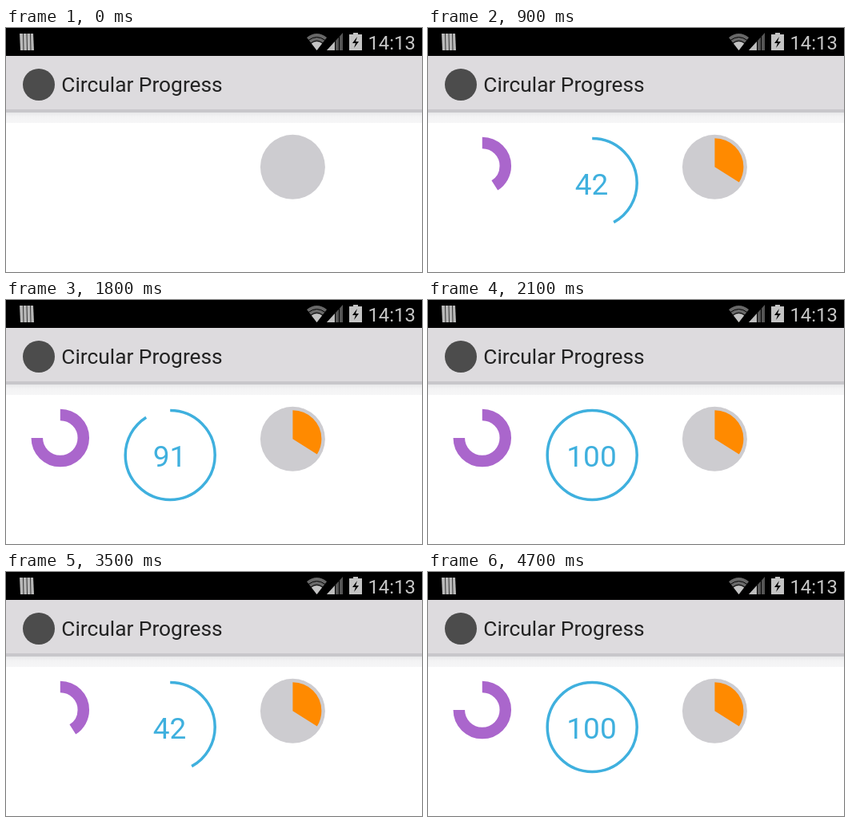
Write an HTML page that moves like this. It is 520x306 px and loops after 5300 ms.

```html
<!DOCTYPE html>
<html lang="en">
<head>
<meta charset="utf-8">
<title>Circular Progress</title>
<style>
  html, body { margin: 0; width: 100%; height: 100%; overflow: hidden; background: #fff; }
  svg { display: block; width: 520px; height: 306px; }
  text { font-family: Roboto, sans-serif; }
  .dial { fill: none; }
</style>
</head>
<body>
<svg viewBox="0 0 520 306">
  <defs>
    <linearGradient id="shade" x2="0" y2="1">
      <stop offset="0" stop-color="#e8e8ea"/>
      <stop offset="0.4" stop-color="#f3f3f4"/>
      <stop offset="1" stop-color="#f6f6f7"/>
    </linearGradient>
  </defs>

  <!-- status bar -->
  <rect width="520" height="35"/>
  <path d="M17 7h17l1 21H18Z" fill="#b9b9b9"/>
  <path d="M21.500 7l.5 21M26 7l.5 21M30.500 7l.5 21" stroke="#333"/>
  <path d="M388.500 28L376 12Q388.500 2 401 12Z" fill="#686868"/>
  <path d="M388.500 28L382 19.500Q388.500 15 395 19.500Z" fill="#c4c4c4"/>
  <path d="M378 15.500Q388.500 7.500 399 15.500M381 19Q388.500 13 396 19" fill="none" stroke="#000"/>
  <path d="M401 28H421V6Z" fill="#555"/>
  <path d="M401 28H411V17Z" fill="#bdbdbd"/>
  <path d="M411.500 6v22M416.500 6v22" stroke="#000"/>
  <path d="M429 8h5V6h6v2h5v20h-16Z" fill="#c4c4c4"/>
  <path d="M439 11l-6 8h4l-2 6 6-8h-4Z"/>
  <text x="452.500" y="26.500" font-size="23.800" fill="#c6c6c6">14:13</text>

  <!-- action bar -->
  <rect y="35" width="520" height="67" fill="#dddbde"/>
  <rect y="102" width="520" height="4" fill="#c8c7cb"/>
  <rect y="106" width="520" height="13" fill="url(#shade)"/>
  <circle cx="41" cy="71" r="20" fill="#4c4c4c"/>
  <text x="69.300" y="80" font-size="26.300" fill="#222">Circular Progress</text>

  <!-- progress views -->
  <circle cx="358.400" cy="174.300" r="40.500" fill="#cdccd0"/>
  <g id="dials"></g>
  <text id="count" x="204.500" y="208.500" font-size="37" text-anchor="middle" fill="#3fb0de"></text>
</svg>
<script>
  const LOOP = 5300, TICK = 100;
  const IDLE = 500;                // empty dials until then
  const FIRST = 400, SECOND = 3000; // start of each run

  // Fast while all dials move, slower once only the thin one is left: [ms, percent]
  const CURVE = [[0, 3], [100, 18], [500, 42], [1000, 77], [1700, 100]];

  // Each dial trails the counter a little and stops at its own limit.
  const DIALS = [
    { x: 67.8, y: 173, r: 29, width: 14.5, color: '#aa66cc', lag: 1, max: 75 },
    { x: 205.2, y: 194.5, r: 56, width: 3.5, color: '#3fb0de', lag: 0, max: 100 },
    { x: 358.4, y: 174.3, r: 18, width: 36, color: '#ff8a00', lag: 1.7, max: 34 }
  ];

  const group = document.getElementById('dials');
  const count = document.getElementById('count');

  function makeDial(d) {
    const el = document.createElementNS('http://www.w3.org/2000/svg', 'circle');
    const attrs = {
      class: 'dial', cx: d.x, cy: d.y, r: d.r, pathLength: 100,
      stroke: d.color, 'stroke-width': d.width,
      transform: `rotate(-90 ${d.x} ${d.y})`
    };
    for (const name in attrs) el.setAttribute(name, attrs[name]);
    group.append(el);
    return el;
  }

  function percentAfter(ms) {
    const i = CURVE.findIndex(([time]) => time > ms);
    if (i < 0) return 100;
    const [t0, p0] = CURVE[i - 1], [t1, p1] = CURVE[i];
    return Math.ceil(p0 + (p1 - p0) * (ms - t0) / (t1 - t0));
  }

  function percentAt(t) {
    if (t < IDLE) return 0;
    let tick = Math.floor(t / TICK);
    if (tick % 4 === 0) tick--; // every fourth refresh is missed
    const time = tick * TICK;
    return percentAfter(time - (time < SECOND ? FIRST : SECOND));
  }

  const rings = DIALS.map(makeDial);

  function show(value) {
    count.textContent = value || '';
    DIALS.forEach((d, i) => {
      const part = Math.max(0, Math.min(value - d.lag, d.max));
      rings[i].setAttribute('stroke-dasharray', `${part} 200`);
      rings[i].setAttribute('visibility', part ? 'visible' : 'hidden');
    });
  }

  const start = performance.now();

  function draw() {
    show(percentAt((performance.now() - start) % LOOP));
    requestAnimationFrame(draw);
  }
  draw();
</script>
</body>
</html>
```
